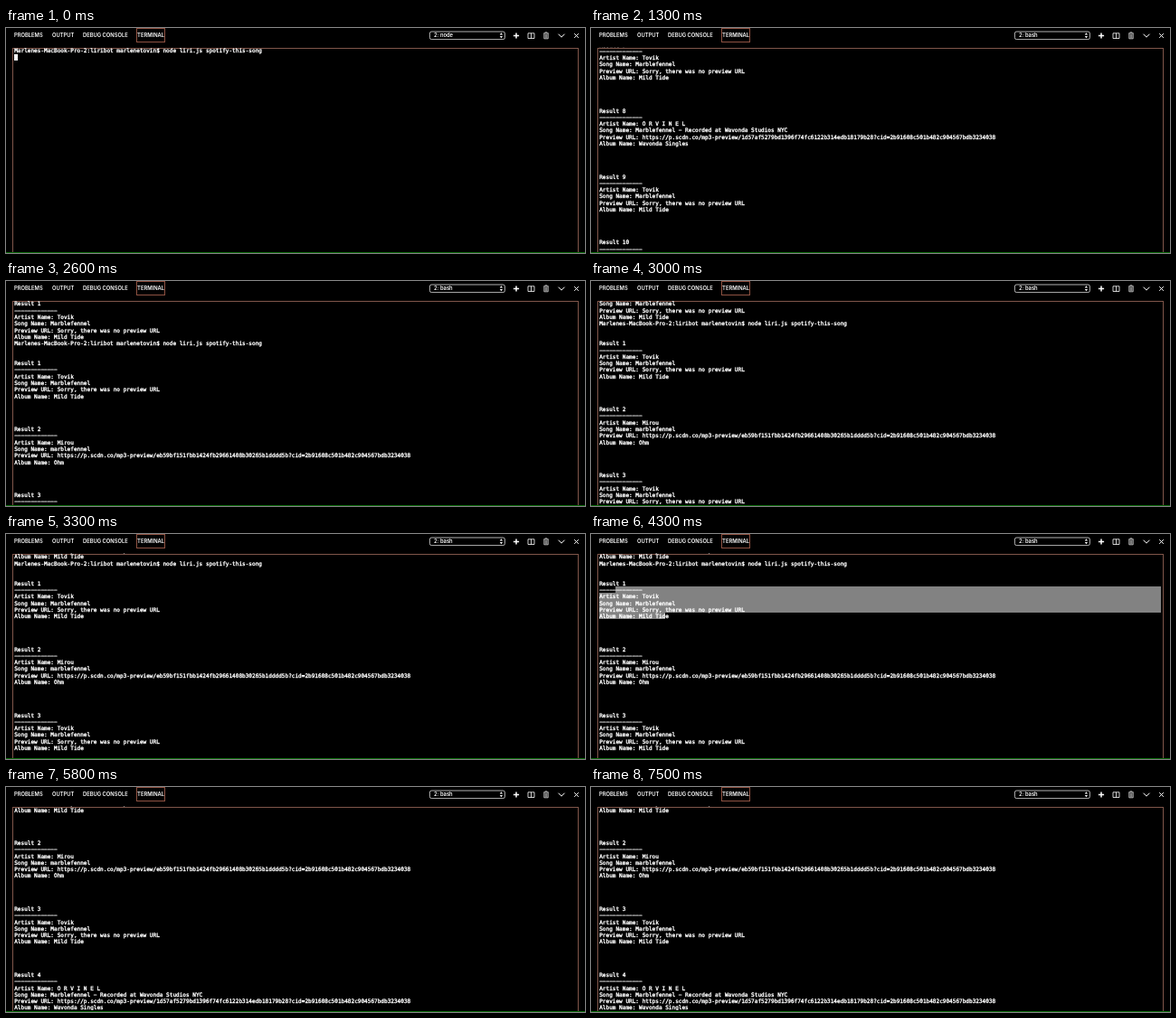
An HTML page that plays this animation: 640x249 px, repeating every 8000 ms.

```html
<!DOCTYPE html>
<html lang="en">
<head>
<meta charset="utf-8">
<title>Terminal</title>
<style>
  :root { --row: 7.29px; --ch: 3.654px; }
  html, body { margin: 0; width: 100%; height: 100%; overflow: hidden; background: #000; }
  #stage { position: relative; width: 640px; height: 249px; overflow: hidden; background: #000; }
  #stage div, #head { position: absolute; }

  #head { left: 0; top: 0; width: 640px; height: 21px; }
  #head text { font: 600 5.8px Inter, Roboto, sans-serif; fill: #fff; }
  #head .line { fill: none; stroke: #fff; }

  #panel { left: 7px; top: 22px; width: 624px; height: 240px; border: 1px solid #80564a; box-sizing: content-box; }
  #edge { left: 0; top: 248px; width: 640px; height: 1px; background: #0a660a; }

  #view { left: 9.2px; top: 21.4px; width: 621.3px; height: 226px; overflow: hidden;
    font: 6.07px/var(--row) "DejaVu Sans Mono", monospace; color: #fff;
    -webkit-text-stroke: .35px #fff; font-variant-ligatures: none; }
  pre { margin: 0; font: inherit; white-space: pre; }
  .block { display: inline-block; width: 4px; height: 7px; background: #fff; vertical-align: top; }

  #log, #out, #wait, .node, .bash, #sel, #mid, #tail { animation: 8s step-end infinite; }
  #log { left: 0; animation-name: scroll; }
  #out { animation-name: after; }
  #wait { left: 0; top: calc(var(--row) * 7); animation-name: before; }
  .node { animation-name: running; }
  .bash { animation-name: idle; }

  #sel { left: 0; top: calc(var(--row) * 5); width: 100%; height: calc(var(--row) * 5); animation-name: select; }
  #sel div { background: #828282; left: 0; height: var(--row); }
  #first { margin-left: calc(var(--ch) * 5); width: 100%; }
  #mid { top: var(--row); width: 100%; animation-name: mid; }
  #tail { animation-name: tail; }

  @keyframes scroll {
    0% { top: calc(var(--row) * -6); }
    1.25% { top: calc(var(--row) * -34); }
    2.5% { top: calc(var(--row) * -79); }
    16.25% { top: calc(var(--row) * -70); }
    17.5% { top: calc(var(--row) * -51); }
    18.75% { top: calc(var(--row) * -31); }
    20% { top: calc(var(--row) * -15); }
    21.25% { top: calc(var(--row) * -6); }
    22.5% { top: calc(var(--row) * -3); }
    23.75% { top: calc(var(--row) * -1); }
    32.5% { top: 0; }
    35% { top: calc(var(--row) * -1); }
    36.25% { top: calc(var(--row) * -2); }
    37.5% { top: calc(var(--row) * -3); }
    38.75% { top: calc(var(--row) * -4); }
    41.25% { top: calc(var(--row) * -5); }
    71.25% { top: calc(var(--row) * -10); }
    72.5%, 100% { top: calc(var(--row) * -14); }
  }
  @keyframes before { 0% { visibility: visible; } 1.25%, 100% { visibility: hidden; } }
  @keyframes after { 0% { visibility: hidden; } 1.25%, 100% { visibility: visible; } }
  @keyframes running { 0% { visibility: visible; } 3.75%, 100% { visibility: hidden; } }
  @keyframes idle { 0% { visibility: hidden; } 3.75%, 100% { visibility: visible; } }
  @keyframes select { 0% { visibility: hidden; } 51.25% { visibility: visible; } 62.5%, 100% { visibility: hidden; } }
  @keyframes mid {
    0% { height: var(--row); }
    52.5%, 100% { height: calc(var(--row) * 3); }
  }
  @keyframes tail {
    0% { top: calc(var(--row) * 2); width: calc(var(--ch) * 11); }
    52.5% { top: calc(var(--row) * 4); width: calc(var(--ch) * 16); }
    53.75%, 100% { top: calc(var(--row) * 4); width: calc(var(--ch) * 20); }
  }
</style>
</head>
<body>
<div id="stage">
  <svg id="head" viewBox="0 0 640 21">
    <text x="9" y="10.4">PROBLEMS</text>
    <text x="51" y="10.4">OUTPUT</text>
    <text x="85" y="10.4">DEBUG CONSOLE</text>
    <text x="145.1" y="10.4">TERMINAL</text>
    <rect x="144.5" y=".5" width="31" height="15" fill="none" stroke="#8f5242"/>

    <rect class="line" x="468.4" y="4" width="83" height="8.6" rx="2" stroke-width=".7"/>
    <text class="node" x="473" y="10.4">2: node</text>
    <text class="bash" x="473" y="10.4">2: bash</text>
    <path d="M545.8 7.6l1.6-2.3 1.6 2.3zM545.8 9l1.6 2.3 1.6-2.3z" fill="#fff"/>

    <path class="line" d="M564 5.4v6.2M560.9 8.5h6.2" stroke-width="1.5"/>
    <path class="line" d="M577 5.8h7v5.7h-7zM580.5 5.8v5.7" stroke-width=".8"/>
    <path class="line" d="M594 6h6M595.8 5.6V4.9h2.4v.7M594.8 6.4v5.4h4.4V6.4M596.2 7v4.2M597.8 7v4.2" stroke-width=".7"/>
    <path class="line" d="M610.5 6.7l3.5 3.5 3.5-3.5" stroke-width="1"/>
    <path class="line" d="M628.2 6.2l4.6 4.6M632.8 6.2l-4.6 4.6" stroke-width="1"/>
  </svg>

  <div id="panel"></div>
  <div id="view">
    <div id="sel"><div id="first"></div><div id="mid"></div><div id="tail"></div></div>
    <div id="log">
      <pre id="past"></pre>
      <pre id="out"></pre>
      <div id="wait"><span class="block"></span></div>
    </div>
  </div>
  <div id="edge"></div>
</div>
<script>
  const prompt = "Marlenes-MacBook-Pro-2:liribot marlenetovin$ ";
  const preview = hash =>
    `https://p.scdn.co/mp3-preview/${hash}?cid=2b91608c501b482c904567bdb3234038`;
  const missing = "Sorry, there was no preview URL";

  const songs = [
    ["Tovik", "Marblefennel", missing, "Mild Tide"],
    ["Mirou", "marblefennel", preview("eb59bf151fbb1424fb29661408b30265b1dddd5b"), "Ohm"],
    ["Tovik", "Marblefennel", missing, "Mild Tide"],
    ["O R V I N E L", "Marblefennel − Recorded at Wavonda Studios NYC",
      preview("1d57af5279bd1396f74fc6122b314edb18179b28"), "Wavonda Singles"],
  ];

  const result = i => {
    const [artist, song, url, album] = songs[i % songs.length];
    return [`Result ${i + 1}`, "−".repeat(13), `Artist Name: ${artist}`,
      `Song Name: ${song}`, `Preview URL: ${url}`, `Album Name: ${album}`].join("\n");
  };

  const gap = "\n".repeat(5);
  const results = Array.from({ length: 10 }, (_, i) => result(i)).join(gap);
  const past = document.getElementById("past");
  const out = document.getElementById("out");
  past.textContent = `${result(0)}\n${prompt}node liri.js spotify-this-song`;
  out.textContent = `\n\n${results}${gap}${prompt}`;

  const block = document.createElement("span");
  block.className = "block";
  out.append(block);
</script>
</body>
</html>
```
